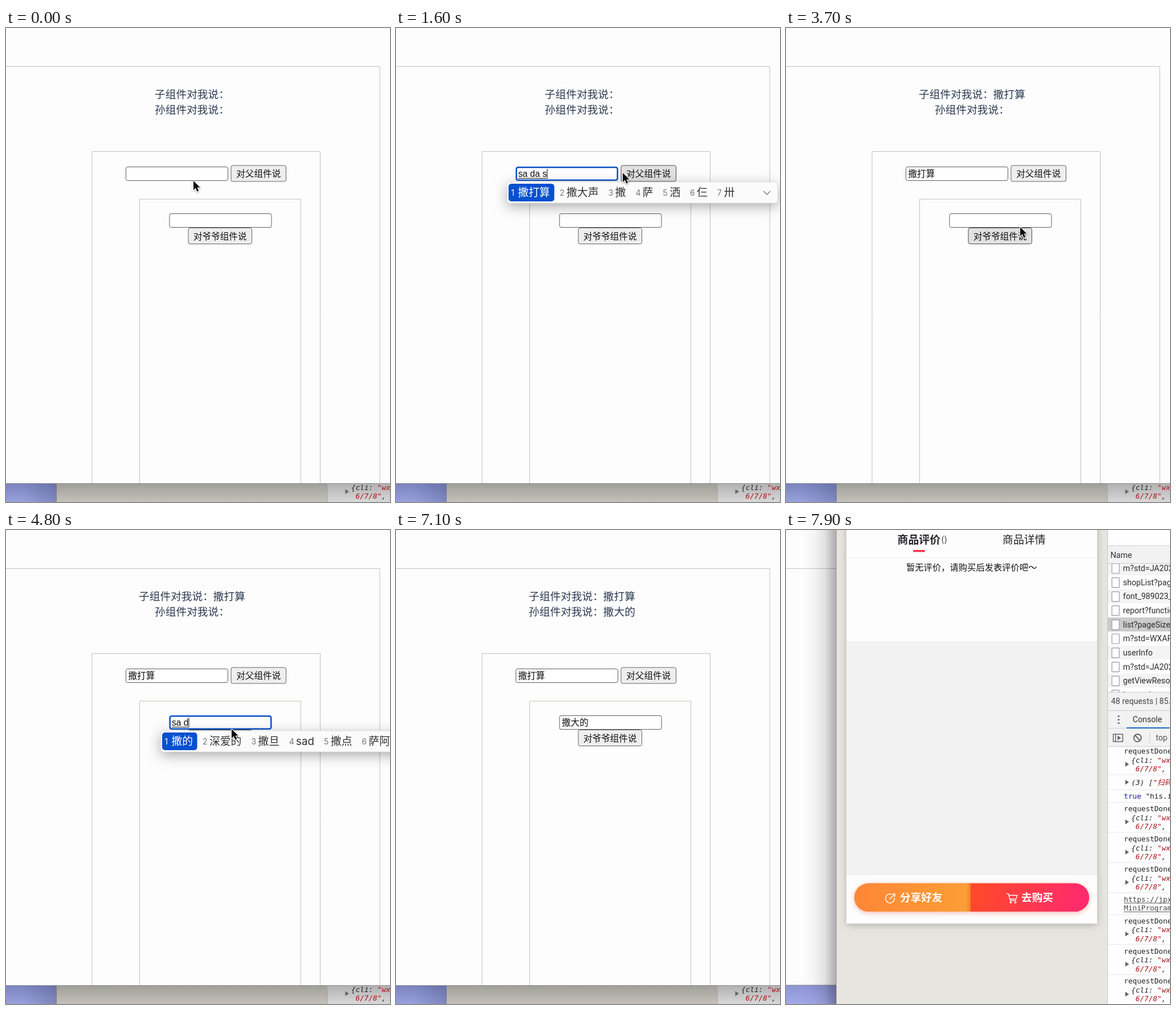
Write an HTML page with a canvas that moves like this. It is 674 px wide and 831 px high and loops after 8000 ms.

```html
<!DOCTYPE html>
<html lang="zh-CN">
<head>
<meta charset="utf-8">
<title>组件通信</title>
<style>
html, body { margin: 0; width: 100%; height: 100%; overflow: hidden; background: #fdfdfd; }
canvas { display: block; width: 100vw; height: 100vh; }
</style>
</head>
<body>
<canvas id="stage" width="674" height="831"></canvas>
<script>
const W = 674, H = 831, LOOP = 8000, STEP = 100;
const ctx = document.getElementById('stage').getContext('2d');

const CJK = '"Noto Sans CJK SC", "Noto Sans CJK", sans-serif';
const ARIAL = '"Liberation Sans", ' + CJK;
const INTER = 'Inter, ' + CJK;
const ROBOTO = 'Roboto, sans-serif';
const MONO = '"DejaVu Sans Mono", "Noto Sans CJK SC", monospace';

const inputs = [
  { x: 210, y: 243, w: 180, h: 25 },
  { x: 286.5, y: 325, w: 180, h: 25 }
];
const buttons = [
  { x: 394.5, y: 240.5, w: 97.5, h: 29, label: '对父组件说' },
  { x: 319.5, y: 350, w: 112.5, h: 29, label: '对爷爷组件说' }
];

// [time, x, y]
const path = [
  [400, 329, 268], [700, 333, 255], [1300, 333, 255], [1600, 398, 254],
  [1800, 430, 257], [2400, 430, 257], [3500, 413, 356], [3700, 411, 349],
  [4200, 396, 341], [4500, 396, 341], [4800, 396, 349], [5300, 396, 349],
  [5700, 384, 372], [6200, 384, 372], [7100, 402, 840]
];
// [time, text, still composing]
const typing = [
  [[0, ''], [1000, 's', 1], [1100, 'sa', 1], [1300, 'sa d', 1], [1400, 'sa da', 1],
   [1500, 'sa da s', 1], [1800, '撒打算']],
  [[0, ''], [4500, 's', 1], [4600, 'sa', 1], [4800, 'sa d', 1], [4900, 'sa da', 1],
   [5100, 'sa da d', 1], [5300, '撒大的']]
];
const focusSpan = [[700, 2100], [4300, 5900]];
const pressSpan = [[2100, 2200], [5900, 6000]];
const SWITCH = 7600;
const candidates = {
  's': '是 说 上 时 岁 三 水',
  'sa': '撒 萨 洒 仨 卅 飒 傻',
  'sa d': '撒的 深爱的 撒旦 sad 撒点 萨阿德',
  'sa da': '撒大 撒打 洒大 撒 萨 洒 仨',
  'sa da s': '撒打算 撒大声 撒 萨 洒 仨 卅',
  'sa da d': '撒大的 撒打的 撒 萨 洒 仨 卅'
};

const within = (t, [a, b]) => t >= a && t < b;
const hit = (p, r) => p.x >= r.x && p.x <= r.x + r.w && p.y >= r.y - 1 && p.y <= r.y + r.h;
const latest = (list, t) => list.filter(e => e[0] <= t).pop();

function rect(x, y, w, h, fill) {
  ctx.fillStyle = fill;
  ctx.fillRect(x, y, w, h);
}

function round(x, y, w, h, r, fill, stroke, lw = 1) {
  ctx.beginPath();
  ctx.roundRect(x, y, w, h, r);
  if (fill) { ctx.fillStyle = fill; ctx.fill(); }
  if (stroke) { ctx.strokeStyle = stroke; ctx.lineWidth = lw; ctx.stroke(); }
}

function line(points, color, lw = 1) {
  ctx.beginPath();
  points.forEach(([x, y]) => ctx.lineTo(x, y));
  ctx.strokeStyle = color;
  ctx.lineWidth = lw;
  ctx.stroke();
}

function poly(points, color) {
  ctx.beginPath();
  points.forEach(([x, y]) => ctx.lineTo(x, y));
  ctx.closePath();
  ctx.fillStyle = color;
  ctx.fill();
}

function text(s, x, y, font, color, align = 'left') {
  ctx.font = font;
  ctx.fillStyle = color;
  ctx.textAlign = align;
  ctx.fillText(s, x, y);
  return ctx.measureText(s).width;
}

function gradient(x0, y0, x1, y1, ...stops) {
  const g = ctx.createLinearGradient(x0, y0, x1, y1);
  stops.forEach((c, i) => g.addColorStop(i / (stops.length - 1), c));
  return g;
}

function shadow(color, blur, dy) {
  ctx.shadowColor = color;
  ctx.shadowBlur = blur;
  ctx.shadowOffsetY = dy;
}

function pointer(t) {
  const last = path[path.length - 1];
  if (t >= last[0]) return null;
  if (t <= path[0][0]) return { x: path[0][1], y: path[0][2] };
  const i = path.findIndex(k => k[0] > t);
  const a = path[i - 1], b = path[i];
  const u = (t - a[0]) / (b[0] - a[0]), e = u * u * (3 - 2 * u);
  return { x: a[1] + (b[1] - a[1]) * e, y: a[2] + (b[2] - a[2]) * e };
}

function drawPointer(p) {
  ctx.save();
  ctx.translate(p.x, p.y);
  if (inputs.some(r => hit(p, { ...r, h: r.h - 2 }))) {
    line([[-3, -8], [0, -7], [3, -8]], '#222', 1.2);
    line([[0, -7], [0, 7]], '#222', 1.2);
    line([[-3, 8], [0, 7], [3, 8]], '#222', 1.2);
  } else {
    const arrow = [[0, 0], [0, 16], [3.8, 12.6], [6.4, 18.8], [9.2, 17.6], [6.7, 11.6], [11.6, 11.4]];
    ctx.lineJoin = 'round';
    shadow('rgba(0,0,0,.35)', 3, 1);
    line([...arrow, [0, 0]], '#fff', 2.4);
    shadow('transparent', 0, 0);
    poly(arrow, '#0a0a0a');
  }
  ctx.restore();
}

function drawInput(r, [, value, composing], focused) {
  const lw = focused ? 2.5 : 1;
  round(r.x + lw / 2, r.y + lw / 2, r.w - lw, r.h - lw, 3, '#fff', focused ? '#0b50c4' : '#5e5e66', lw);
  const x = r.x + 4.5, base = r.y + 18;
  const w = text(value, x, base, '15.6px ' + ARIAL, '#111');
  if (composing) rect(x, base + 2, w, 1, '#222');
  if (focused && (composing || !value)) rect(x + w, r.y + 4, 1, 17, '#111');
}

function drawButton(b, hover, pressed) {
  const fill = pressed ? '#f5f5f5' : hover ? '#e1e1e1' : '#eeeeee';
  round(b.x + .5, b.y + .5, b.w - 1, b.h - 1, 3, fill, hover ? '#4c4c52' : '#646469');
  text(b.label, b.x + b.w / 2, b.y + 20.5, '15.6px ' + CJK, '#111', 'center');
}

function drawCandidates(r, value) {
  const x = r.x - 15, y = r.y + 27;
  ctx.save();
  shadow('rgba(0,0,0,.32)', 22, 6);
  round(x, y, 475, 37, 5, '#fbfbfb');
  ctx.restore();
  round(x, y, 475, 37, 5, null, '#d4d4d4', .6);
  let cx = x + 7;
  candidates[value].split(' ').forEach((word, i) => {
    ctx.font = '18.8px ' + INTER;
    const w = ctx.measureText(word).width;
    if (!i) round(x + 2.5, y + 3, w + 24, 31, 5, '#0650cf');
    text(i + 1, cx, y + 24, '14px ' + INTER, i ? '#777' : '#fff');
    text(word, cx + 12, y + 25, '18.8px ' + INTER, i ? '#333' : '#fff');
    cx += w + 29;
  });
  line([[x + 450, y + 16], [x + 456, y + 22], [x + 462, y + 16]], '#777', 1.4);
}

// One logged object; y is the middle of its first line.
function logObject(y) {
  const font = 'italic 12.7px ' + MONO;
  poly([[595.5, y + 3.5], [595.5, y + 12], [602, y + 7.7]], '#666');
  let x = 606;
  x += text('{cli: ', x, y + 4.5, font, '#222');
  text('"wx1', x, y + 4.5, font, '#a81216');
  x = 613.5;
  x += text('6/7/8"', x, y + 20, font, '#a81216');
  text(',', x, y + 20, font, '#222');
}

function drawPage(t) {
  rect(0, 0, W, H, '#fdfdfd');
  line([[0, 67.5], [656, 67.5], [656, 798]], '#c0c0c4');
  line([[151, 798], [151, 216.5], [551.5, 216.5], [551.5, 798]], '#c0c0bc');
  line([[234.5, 798], [234.5, 300], [517.5, 300], [517.5, 798]], '#c0c0b8');

  const font = '18.7px ' + CJK;
  const said = i => t >= pressSpan[i][1] ? typing[i][typing[i].length - 1][1] : '';
  text('子组件对我说：' + said(0), 326.5, 123.3, font, '#2c3a50', 'center');
  text('孙组件对我说：' + said(1), 326.5, 150.3, font, '#2c3a50', 'center');

  const p = pointer(t);
  buttons.forEach((b, i) => drawButton(b, p && hit(p, b), within(t, pressSpan[i])));
  const states = typing.map(list => latest(list, t));
  inputs.forEach((r, i) => drawInput(r, states[i], within(t, focusSpan[i])));
  states.forEach((s, i) => { if (s[2]) drawCandidates(inputs[i], s[1]); });

  rect(0, 798, 88, 33, gradient(0, 798, 0, H, '#7a83be', '#98a1dc'));
  rect(0, 798, 88, 33, gradient(30, 0, 88, 0, 'rgba(50,60,100,0)', 'rgba(50,60,100,.25)'));
  rect(88, 798, 477, 33, gradient(0, 798, 0, H, '#a09e99', '#c4c1ba'));
  rect(565, 798, 109, 33, gradient(0, 798, 0, H, '#b0b0b0', '#d8d8d8'));
  rect(0, 798, W, 1, '#8e8e92');
  rect(88, 798, 1, 33, '#777c90');
  rect(564, 798, 1, 33, '#aaa');
  logObject(805);
  if (p) drawPointer(p);
}

function drawShop() {
  rect(88, 0, 477, H, '#e7e5e0');
  ctx.save();
  shadow('rgba(0,0,0,.22)', 12, 3);
  rect(106, -20, 440, 710, '#fdfdfd');
  ctx.restore();
  rect(106, 48, 440, 1, '#f0f0f4');
  rect(106, 195, 440, 410, '#f2f2f3');

  const w = text('商品评价', 195.5, 24, 'bold 18.9px ' + CJK, '#26262c');
  text('()', 196 + w + 1, 22, '15px ' + CJK, '#333');
  text('商品详情', 380, 24, '500 18.9px ' + CJK, '#222');
  round(223, 35, 21, 3.5, 1.5, '#fb3048');
  text('暂无评价，请购买后发表评价吧～', 211, 70.5, '500 15.3px ' + CJK, '#111');

  ctx.save();
  shadow('rgba(230,70,50,.4)', 8, 2);
  round(120, 619.5, 412, 49.5, 25, '#ff6a3a');
  ctx.restore();
  round(120, 619.5, 204, 49.5, [25, 0, 0, 25], gradient(120, 0, 324, 0, '#ff8637', '#fb9f36'));
  round(324, 619.5, 208, 49.5, [0, 25, 25, 0], gradient(324, 619, 532, 669, '#ff4a26', '#ff2873'));
  rect(316, 619.5, 8, 49.5, gradient(316, 0, 324, 0, 'rgba(190,60,20,0)', 'rgba(190,60,20,.28)'));
  text('分享好友', 200, 651, 'bold 18.7px ' + CJK, '#fff');
  text('去购买', 413, 651, 'bold 18.7px ' + CJK, '#fff');

  ctx.beginPath();
  ctx.arc(182.5, 646, 7.8, -.2, 5.1);
  ctx.strokeStyle = '#fff';
  ctx.lineWidth = 1.5;
  ctx.stroke();
  line([[182, 647], [191, 638.5]], '#fff', 1.4);
  line([[186.5, 638.2], [191, 638.2], [191, 642.7]], '#fff', 1.4);
  line([[387, 637.5], [390.5, 638], [393.5, 649.5], [404, 649.5]], '#fff', 1.4);
  line([[391, 640.5], [406, 640.5], [403.5, 647], [393, 647]], '#fff', 1.3);
  [394.5, 402.5].forEach(x => round(x - 1.4, 651.3, 2.8, 2.8, 1.4, null, '#fff', 1.2));
}

function drawNetwork() {
  rect(565, 0, 109, H, '#fefefe');
  const font = '14.2px ' + ROBOTO;
  const rows = ['m?std=JA202', 'shopList?page', 'font_989023_', 'report?functio', 'list?pageSize',
    'm?std=WXAP', 'userInfo', 'm?std=JA202', 'getViewResou', 'hotproduct'];
  rows.forEach((s, i) => {
    const y = 67 + i * 24.65;
    rect(565, y - 12.3, 109, 24.65, i === 4 ? '#cbcbcb' : i % 2 ? '#fefefe' : '#f4f4f4');
    round(572, y - 8, 13, 17, 1, '#fff', '#999', 1.2);
    text(s, 591.5, y + 5, font, '#2d2d2d');
  });
  rect(565, 27, 109, 32, '#f2f2f2');
  rect(565, 27, 109, 1, '#d0d0d0');
  rect(565, 58, 109, 1, '#cccccc');
  text('Name', 569.5, 48.5, font, '#333');
  rect(565, 284, 109, 95, '#f2f2f2');
  [284, 316, 347, 379].forEach(y => rect(565, y, 109, 1, '#cdcdcd'));
  text('48 requests | 85.3', 570.5, 305, font, '#444');
  [326.5, 332.5, 338.5].forEach(y => round(582.3, y - 1.6, 3.2, 3.2, 1.6, '#666'));
  text('Console', 608.5, 337, font, '#333');
  rect(598, 346, 75, 2, '#1a66cc');

  round(574.5, 358, 16.5, 13, 0, null, '#666', 1.5);
  line([[578.5, 358], [578.5, 371]], '#666', 1.5);
  poly([[582, 360.5], [582, 368.5], [588, 364.5]], '#666');
  round(610.5, 358, 13, 13, 6.5, null, '#666', 2);
  line([[612.5, 360], [621.5, 369]], '#666', 2);
  rect(638, 355, 1, 19, '#ccc');
  text('top', 649, 369, font, '#555');
}

function drawConsole() {
  const font = '12.7px ' + MONO;
  ctx.save();
  ctx.beginPath();
  ctx.rect(565, 380, 109, H - 380);
  ctx.clip();
  [387.5, 488.5, 541.5, 594.5, 685, 738, 790.5].forEach(y => {
    text('requestDone', 593, y + 4.5, font, '#222');
    logObject(y + 15.5);
    rect(565, y + 41, 109, 1, '#e9e9e9');
  });
  poly([[595.5, 438], [595.5, 446.5], [602, 442.2]], '#666');
  let w = text('(3) [', 606, 447, 'italic ' + font, '#222');
  text('"扫码', 606 + w, 447, 'italic ' + font, '#a81216');
  w = text('true ', 593, 470.5, font, '#1a1aa6');
  text('"his.i', 593 + w, 470.5, font, '#222');
  ['https://jpx', 'MiniProgram'].forEach((s, i) => {
    text(s, 593, 651.5 + i * 15.5, font, '#444');
    rect(593, 653.5 + i * 15.5, 81, 1, '#555');
  });
  [455, 477, 674].forEach(y => rect(565, y, 109, 1, '#e9e9e9'));
  ctx.restore();
}

function drawDesk() {
  rect(0, 0, 88, 798, '#fdfdfd');
  rect(0, 67, 88, 1, '#c4c4c4');
  rect(0, 798, 88, 33, gradient(0, 798, 0, H, '#8d94d4', '#a3a9e8'));
  rect(0, 797.5, 88, 1, '#858593');
  rect(28, 0, 60, H, gradient(28, 0, 88, 0,
    'rgba(0,0,0,0)', 'rgba(0,0,0,.03)', 'rgba(0,0,0,.11)', 'rgba(0,0,0,.32)'));
  drawShop();
  rect(88, 0, 1, H, '#a9a9a6');
  drawNetwork();
  drawConsole();
  rect(564, 0, 1, H, '#c6c6c4');
}

function frame() {
  const t = Math.floor(performance.now() % LOOP / STEP) * STEP;
  if (t < SWITCH) drawPage(t);
  else drawDesk();
  requestAnimationFrame(frame);
}
frame();
</script>
</body>
</html>
```
